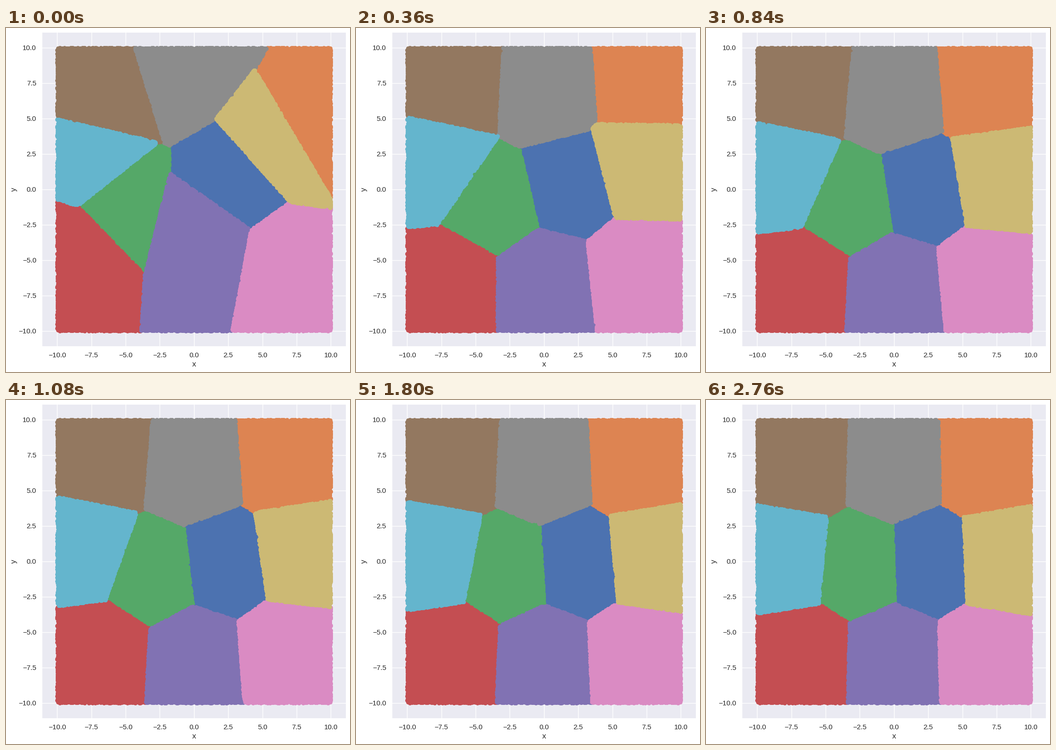
A matplotlib script that plays this animation: 748 px wide and 748 px high, repeating every 2880 ms.

```python
import numpy as np
import matplotlib.pyplot as plt
from matplotlib.animation import FuncAnimation

SIZE, DPI = 748, 100
FRAMES, INTERVAL = 24, 120
POINTS = 100_000
INK = "#262626"

# One colour and one starting centre per cluster, in drawing order.
COLORS = ["#4C72B0", "#DD8452", "#55A868", "#C44E52", "#8172B3",
          "#937860", "#DA8BC3", "#8C8C8C", "#CCB974", "#64B5CD"]
START = np.array([
    (3.70, -0.60), (8.66, 3.45), (-7.08, -0.95), (-8.71, -2.59),
    (1.88, -3.28), (-6.08, 8.44), (6.09, -4.09), (-2.02, 9.74),
    (6.96, 2.41), (-7.93, 0.16)])


def make_cloud():
    """Mirrored random points, slightly denser low in the middle."""
    quarter = np.random.default_rng(7).uniform(0, 10, (POINTS // 4, 2))
    x, y = np.concatenate([quarter * (sx, sy)
                           for sx in (-1, 1) for sy in (-1, 1)]).T
    y = y - 0.25 * np.cos(np.pi * x / 10) * (1 - (y / 10) ** 2)
    return np.column_stack([x, y])


def nearest(points, centers):
    """Index of the closest centre for every point."""
    score = (centers ** 2).sum(axis=1) - 2 * points @ centers.T
    return score.argmin(axis=1)


def cluster_steps(points, centers, count):
    """Labels after each round of k-means."""
    steps = []
    for _ in range(count):
        labels = nearest(points, centers)
        steps.append(labels)
        centers = np.array([points[labels == k].mean(axis=0)
                            for k in range(len(centers))])
    return steps


def make_axes(fig):
    left, right, top, bottom = 79, 738.5, 10, 691.5
    ax = fig.add_axes([left / SIZE, 1 - bottom / SIZE,
                       (right - left) / SIZE, (bottom - top) / SIZE])
    ax.set(xlim=(-11.08, 11.08), ylim=(-11.06, 11.06), facecolor="#EAEAF2")
    ticks = np.linspace(-10, 10, 9)
    ax.set_xticks(ticks)
    ax.set_yticks(ticks)
    ax.set_axisbelow(True)
    ax.grid(color="white", linewidth=1)
    ax.tick_params(length=0, pad=9.5, labelsize=11, labelcolor=INK)
    ax.set_xlabel("x", fontsize=12, color=INK)
    ax.set_ylabel("y", fontsize=12, color=INK, labelpad=1.8)
    for spine in ax.spines.values():
        spine.set_visible(False)
    return ax


plt.rcParams["font.family"] = "Liberation Sans"
fig = plt.figure(figsize=(SIZE / DPI, SIZE / DPI), dpi=DPI, facecolor="white")
ax = make_axes(fig)

cloud = make_cloud()
steps = cluster_steps(cloud, START, FRAMES)
layers = [ax.plot([], [], "o", color=c, markersize=6.5, markeredgewidth=0)[0]
          for c in COLORS]


def draw(frame):
    for k, layer in enumerate(layers):
        layer.set_data(*cloud[steps[frame] == k].T)
    return layers


anim = FuncAnimation(fig, draw, frames=FRAMES, interval=INTERVAL,
                     repeat=True, repeat_delay=0)
plt.show()
```
